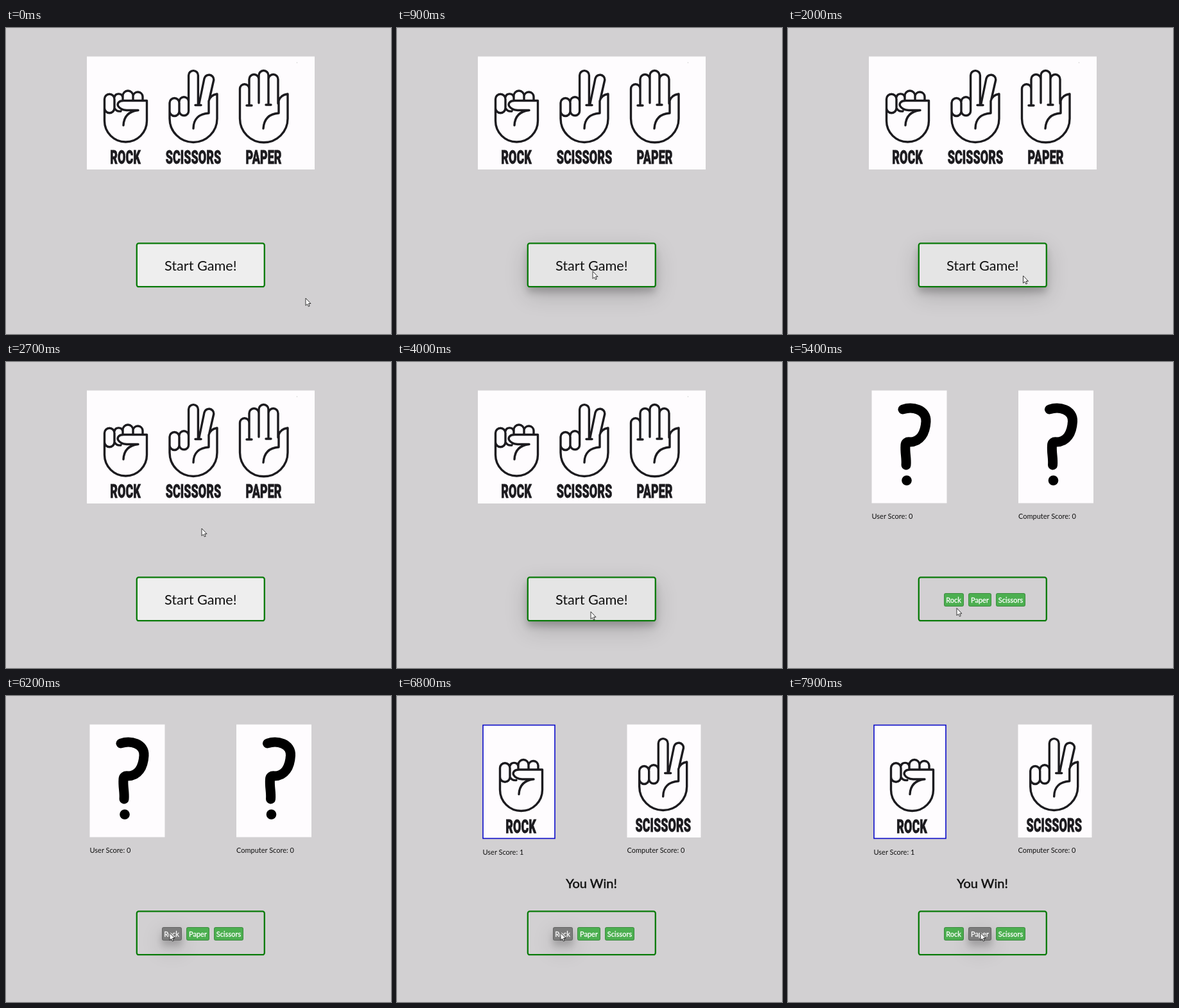
These frames come from a looping animation (600x478 px, 8 s). An HTML page:

```html
<!DOCTYPE html>
<html lang="en">
<head>
<meta charset="utf-8">
<title>Rock Scissors Paper</title>
<style>
html, body { margin: 0; width: 100%; height: 100%; overflow: hidden; background: #d2d0d2; }
svg { position: absolute; left: 0; top: 0; }
.btn, .frame {
  --h: 0;
  position: absolute; box-sizing: border-box;
  background: color-mix(in srgb, var(--hot) calc(var(--h) * 100%), var(--cold));
  box-shadow: 0 8px 11px rgb(0 0 0 / calc(.19 * var(--h))),
              0 12px 35px rgb(0 0 0 / calc(.19 * var(--h)));
}
.btn { --cold: #4caf50; --hot: #7c7c7c; top: 361px; height: 21px; border: 1px solid #0003; border-radius: 3px; }
.frame { --cold: #eee; --hot: #e5e5e5; left: 203px; top: 336px; width: 200px; height: 69px; border-radius: 4px; }
text { font-family: Lato, "Open Sans", sans-serif; fill: #111; }
.mid { text-anchor: middle; }
.small { font-size: 11px; }
.light { fill: #fff; stroke: #fff; stroke-width: .3; }
.label { font: 900 30px Roboto, sans-serif; fill: #1c1b1f; stroke: #1c1b1f; stroke-width: .8; }
.card { fill: #fefcfe; }
.hand { fill: none; stroke: #1c1b1f; stroke-width: 3.4; stroke-linecap: round; stroke-linejoin: round; }
.mark { fill: none; stroke: #000; stroke-width: 15; stroke-linecap: round; stroke-linejoin: round; }
</style>
</head>
<body>
<div class="frame" id="frame"></div>
<div id="choices">
  <div class="btn" id="rockBtn" style="left:243px;width:31px"></div>
  <div class="btn" id="paperBtn" style="left:281px;width:36px"></div>
  <div class="btn" style="left:324px;width:46px"></div>
</div>
<svg width="600" height="478" viewBox="0 0 600 478">
  <defs>
    <g id="rock">
      <path class="hand" d="M153.5 124V145A33 33 0 0 0 219.5 145V113.5H183
        C176 113.5 173 118 174.5 121.5Q178 128 188 128.5H206Q184 131 183 152
        M153.5 125V111A7.7 7.7 0 0 1 169 111V125A7.7 7.7 0 0 1 153.5 125
        M169 108A6.7 6.7 0 0 1 182 108V113M169 125Q172 131 179 130
        M182 109V106A8 8 0 0 1 198 106V113M198 106A7.6 7.6 0 0 1 213 107V113"/>
      <text class="label mid" transform="translate(186 212) scale(.6 1)">ROCK</text>
    </g>
    <g id="scissors">
      <path class="hand" d="M255 130V141.5A37 37 0 0 0 329 141.5V103Q318 105 316 114V133
        C301 134 292 142 292 157
        M255 130V117A7.5 7.5 0 0 1 270 117V130A7.5 7.5 0 0 1 255 130
        M270 115A7.3 7.3 0 0 1 284.6 115V129A7.3 7.3 0 0 1 270 130
        M284.6 115V74A7.4 7.4 0 0 1 299.4 74V120M295 120.5H304
        M301 118L309 79A7.5 7.5 0 0 1 323.8 81L317 111"/>
      <text class="label mid" transform="translate(292 212) scale(.6 1)">SCISSORS</text>
    </g>
    <g id="paper">
      <path class="hand" d="M379 121V95A7.2 7.2 0 0 0 364.5 95V141.5A37.2 37.2 0 0 0 439 141.5V103
        Q427 105 425 114V133C410 134 402 142 401 157
        M379 95V80A7.5 7.5 0 0 1 394 80V117M394 80V74A7.5 7.5 0 0 1 409 74V119
        M409 80A7.5 7.5 0 0 1 424 80V118M375 121H383M405 120H413"/>
      <text class="label mid" transform="translate(401.5 212) scale(.6 1)">PAPER</text>
    </g>
    <g id="unknown">
      <rect class="card" x="130.5" y="44.5" width="117" height="176"/>
      <path class="mark" d="M179 74C194 69 216 74 215 93C214 111 206 125 190 125Q183 124 183 130C182 142 185 150 184 161"/>
      <circle cx="185" cy="185" r="7.8"/>
    </g>
  </defs>

  <rect x="203.8" y="336.4" width="199" height="67.8" rx="3" fill="none" stroke="#087a08" stroke-width="2.3"/>

  <g id="intro">
    <rect class="card" x="126" y="44.5" width="355" height="176.5"/>
    <circle cx="453.5" cy="54" r=".6" fill="#aaa"/>
    <use href="#rock"/><use href="#scissors"/><use href="#paper"/>
    <text class="mid" x="303.3" y="378.5" font-size="21.7">Start Game!</text>
  </g>

  <g id="waiting">
    <use href="#unknown"/><use href="#unknown" x="228.5"/>
    <text class="small" x="130.5" y="244.5">User Score: 0</text>
    <text class="small" x="359" y="244.5">Computer Score: 0</text>
  </g>

  <g id="result">
    <rect class="card" x="134" y="45.5" width="112" height="177" stroke="#0a0ac8" stroke-width="1.6"/>
    <rect class="card" x="358.5" y="44.5" width="115" height="176.5"/>
    <use href="#rock" x="7" y="1.5"/><use href="#scissors" x="122.7"/>
    <text class="small" x="133.5" y="247.5">User Score: 1</text>
    <text class="small" x="358.5" y="244.5">Computer Score: 0</text>
    <text class="mid" x="303" y="300" font-size="20" stroke="#111" stroke-width=".5">You Win!</text>
  </g>

  <g id="names">
    <text class="small light mid" x="258" y="375.7">Rock</text>
    <text class="small light mid" x="299" y="375.7">Paper</text>
    <text class="small light mid" x="347" y="375.7">Scissors</text>
  </g>

  <path id="cursor" d="M0 0V11.5L2.6 9.2L4.4 13L6.2 12.2L4.5 8.5H8Z" fill="#fff" stroke="#222" stroke-width=".9"/>
</svg>
<script>
const LOOP = 8000, STEP = 100, START = 4900, PLAY = 6600;
const $ = id => document.getElementById(id);

// time, x, y of the pointer tip
const path = [
  [0, 467, 422], [300, 440, 465], [500, 375, 440], [700, 318, 395], [900, 305, 380],
  [1900, 308, 384], [2100, 425, 390], [2300, 513, 350], [2500, 410, 285], [2700, 305, 260],
  [2900, 220, 278], [3100, 121, 340], [3350, 180, 427], [3600, 285, 402], [3800, 302, 390],
  [4900, 302, 390], [5300, 264, 385], [5500, 262, 384], [5700, 256, 373], [6000, 255, 370],
  [7400, 255, 370], [7600, 296, 371], [7900, 300, 370], [8000, 300, 370]
];

const clamp = v => Math.min(1, Math.max(0, v));
const ease = u => u * u * (3 - 2 * u);
const fade = (t, from) => ease(clamp((t - from) / 350));
const hover = (t, from, to) => fade(t, from) * (1 - fade(t, to));
const show = (id, on) => $(id).style.display = on ? "" : "none";
const heat = (id, h) => $(id).style.setProperty("--h", h);

function pointer(t) {
  const i = path.findIndex(p => p[0] > t);
  const [t0, x0, y0] = path[i - 1], [t1, x1, y1] = path[i];
  const u = (t - t0) / (t1 - t0);
  return [x0 + (x1 - x0) * u, y0 + (y1 - y0) * u];
}

function draw(t) {
  const playing = t >= START;
  show("frame", !playing);
  show("intro", !playing);
  show("waiting", playing && t < PLAY);
  show("result", t >= PLAY);
  show("choices", playing);
  show("names", playing);
  heat("frame", hover(t, 600, 2050) + hover(t, 3550, LOOP));
  heat("rockBtn", hover(t, 5650, 7450));
  heat("paperBtn", hover(t, 7500, LOOP));
  $("cursor").setAttribute("transform", `translate(${pointer(t)})`);
}

const begin = performance.now();
function tick() {
  const t = (performance.now() - begin) % LOOP;
  draw(Math.floor(t / STEP) * STEP);
  requestAnimationFrame(tick);
}
tick();
</script>
</body>
</html>
```
